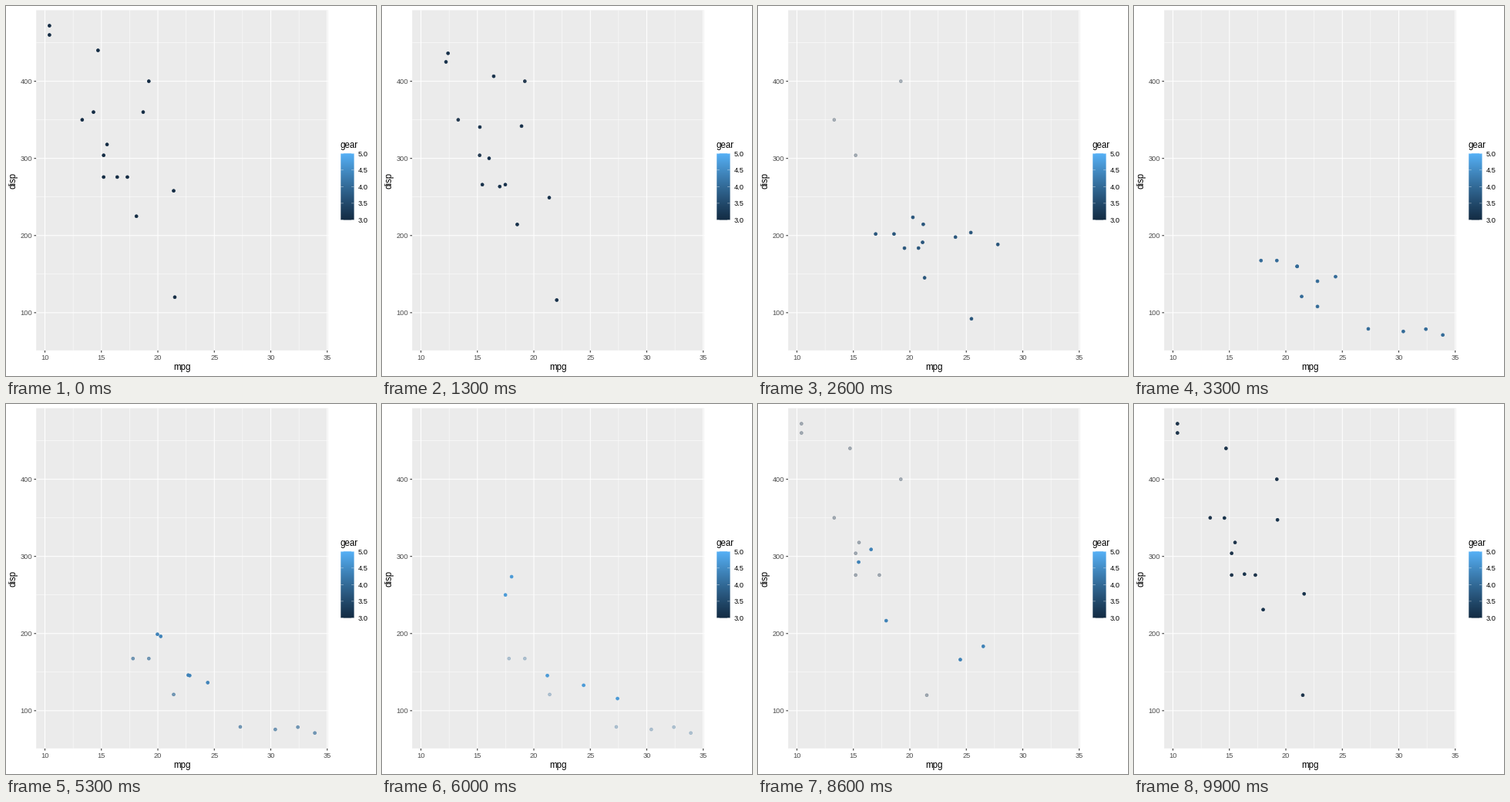
These frames come from a looping animation (480x480 px, 10 s). A matplotlib script:

```python
import math

import numpy as np
import matplotlib.pyplot as plt
from matplotlib.animation import FuncAnimation
from matplotlib.patches import Circle, Rectangle

SIZE = 480
DPI = 72  # one point is one pixel
FRAMES, INTERVAL = 100, 100
FIRST_MOVE, PERIOD, STEPS = 11, 34, 22

plt.rcParams["font.family"] = "Liberation Sans"
TITLE_SIZE, LABEL_SIZE = 11.5, 9.3
GREY_TEXT, GREY_TICK = "#4D4D4D", "#333333"
MAJOR, MINOR, BAR_TICK = 1.067, 0.533, 0.375
DOT_RADIUS, DOT_EDGE = 1.95, 0.709


def group(*runs):
    """Each run is one disp followed by the mpg of the cars sharing it."""
    return np.array([(mpg, disp) for disp, *mpgs in runs for mpg in mpgs])


CARS = {
    3: group((258, 21.4), (360, 18.7), (225, 18.1), (360, 14.3),
             (275.8, 16.4, 17.3, 15.2), (472, 10.4), (460, 10.4),
             (440, 14.7), (120.1, 21.5), (318, 15.5), (304, 15.2),
             (350, 13.3), (400, 19.2)),
    4: group((160, 21, 21), (108, 22.8), (146.7, 24.4), (140.8, 22.8),
             (167.6, 19.2, 17.8), (78.7, 32.4), (75.7, 30.4), (71.1, 33.9),
             (79, 27.3), (121, 21.4)),
    5: group((120.3, 26), (95.1, 30.4), (351, 15.8), (145, 19.7), (301, 15)),
}
GEARS = list(CARS)

# Layout: everything is spaced by half a text line
HALF = 5.5 * 72 / 72.27
TICK = HALF / 2
TITLE_H = 11
BAR_W = 1.2 * 14.4
BAR_H = 5 * BAR_W
AXIS = HALF + TITLE_H + HALF / 2 + 0.4 * HALF + TICK
LEFT, TOP = AXIS + 15, HALF
RIGHT, BOTTOM = SIZE - 6 * HALF - BAR_W - 12, SIZE - AXIS - 9
MID_X, MID_Y = (LEFT + RIGHT) / 2, (TOP + BOTTOM) / 2
BAR_LEFT = RIGHT + 3 * HALF
BAR_RIGHT = BAR_LEFT + BAR_W
BAR_TOP = MID_Y + (TITLE_H + HALF - BAR_H) / 2
BAR_BOTTOM = BAR_TOP + BAR_H

# Data limits, widened by a twentieth on each side
points = np.concatenate(list(CARS.values()))
low, high = points.min(axis=0), points.max(axis=0)
low, high = low - (high - low) / 20, high + (high - low) / 20


def px(mpg):
    return LEFT + (mpg - low[0]) / (high[0] - low[0]) * (RIGHT - LEFT)


def py(disp):
    return BOTTOM - (disp - low[1]) / (high[1] - low[1]) * (BOTTOM - TOP)


DARK = np.array([19, 43, 67])
LIGHT = np.array([86, 177, 247])
SAG = np.array([2.5, 4, 6])  # the ramp is a little darker in the middle


def gear_color(gear):
    t = (np.asarray(gear)[..., None] - 3) / 2
    return (DARK + (LIGHT - DARK) * t - SAG * 4 * t * (1 - t)) / 255


fig = plt.figure(figsize=(SIZE / DPI, SIZE / DPI), dpi=DPI, facecolor="white")
ax = fig.add_axes([0, 0, 1, 1])
ax.axis("off")


def line(x0, y0, x1, y1, width, color="white", z=2):
    ax.plot([x0, x1], [y0, y1], color=color, lw=width, zorder=z,
            solid_capstyle="butt", snap=False)


def label(x, y, text, size=LABEL_SIZE, color="black", ha="left", **kw):
    ax.text(x, y, text, fontsize=size, color=color, ha=ha, va="baseline", **kw)


def draw_panel():
    ax.add_patch(Rectangle((LEFT, TOP), RIGHT - LEFT, BOTTOM - TOP,
                           fc="#EBEBEB", lw=0, zorder=1, snap=False))
    for mpg in np.arange(12.5, 35, 5):
        line(px(mpg), TOP, px(mpg), BOTTOM, MINOR)
    for disp in range(150, 500, 100):
        line(LEFT, py(disp), RIGHT, py(disp), MINOR)
    for mpg in range(10, 40, 5):
        x = px(mpg)
        line(x, TOP, x, BOTTOM, MAJOR, z=3)
        line(x, BOTTOM, x, BOTTOM + TICK, MAJOR, GREY_TICK)
        label(x, 459, str(mpg), color=GREY_TEXT, ha="center")
    for disp in range(100, 500, 100):
        y = py(disp)
        line(LEFT, y, RIGHT, y, MAJOR, z=3)
        line(LEFT - TICK, y, LEFT, y, MAJOR, GREY_TICK)
        label(LEFT - 0.9 * HALF, round(y + 3.4), str(disp),
              color=GREY_TEXT, ha="right")
    label(MID_X, 472, "mpg", TITLE_SIZE, ha="center")
    label(13, MID_Y, "disp", TITLE_SIZE, ha="center",
          rotation=90, rotation_mode="anchor")


def coverage(lo, hi):
    """Pixels touched by lo..hi and the share of each that is covered."""
    cells = np.arange(math.floor(lo), math.ceil(hi))
    return cells, np.minimum(cells + 1, hi) - np.maximum(cells, lo)


def draw_legend():
    label(BAR_LEFT - 0.7, 184, "gear", TITLE_SIZE)
    xs, cover_x = coverage(BAR_LEFT, BAR_RIGHT)
    ys, cover_y = coverage(BAR_TOP, BAR_BOTTOM)
    gears = 5 - 2 * np.clip((ys + 0.5 - BAR_TOP) / BAR_H, 0, 1)
    ramp = np.empty((len(ys), len(xs), 4))
    ramp[..., :3] = gear_color(gears)[:, None]
    ramp[..., 3] = np.outer(cover_y, cover_x)
    ax.imshow(ramp, extent=(xs[0], xs[-1] + 1, ys[-1] + 1, ys[0]),
              aspect="auto", interpolation="nearest", zorder=1)
    for gear in np.arange(3, 5.1, 0.5):
        y = MID_Y + (TITLE_H + HALF) / 2 - (gear - 4) * (BAR_H / 2 - 0.14)
        line(BAR_LEFT, y, BAR_LEFT + BAR_W / 5, y, BAR_TICK)
        line(BAR_RIGHT - BAR_W / 5, y, BAR_RIGHT, y, BAR_TICK)
        label(BAR_RIGHT + HALF, round(y + 3.5), f"{gear:.1f}")


draw_panel()
draw_legend()
ax.set_xlim(0, SIZE)
ax.set_ylim(SIZE, 0)

dots = [ax.add_patch(Circle((0, 0), DOT_RADIUS, lw=DOT_EDGE, zorder=5))
        for _ in CARS[3]]


def pose(frame):
    """Gear before, gear after and the linear progress between them."""
    turn, step = divmod((frame - FIRST_MOVE) % FRAMES, PERIOD)
    steps = min(STEPS, FRAMES - FIRST_MOVE - turn * PERIOD)
    return GEARS[turn], GEARS[(turn + 1) % 3], min(step / steps, 1)


def update(frame):
    a, b, t = pose(frame)
    old, new = CARS[a], CARS[b]
    for i, dot in enumerate(dots):
        gear, alpha = a + (b - a) * t, 1
        if i < len(old) and i < len(new):
            spot = old[i] + (new[i] - old[i]) * t
        elif i < len(old):
            spot, gear, alpha = old[i], a, 1 - t
        elif i < len(new):
            spot, gear, alpha = new[i], b, t
        else:
            alpha = 0
        dot.set_visible(alpha > 0)
        if alpha > 0:
            dot.center = px(spot[0]), py(spot[1])
            dot.set_color((*gear_color(gear), alpha))
    return dots


anim = FuncAnimation(fig, update, frames=FRAMES, interval=INTERVAL,
                     init_func=lambda: update(0), repeat=True, repeat_delay=0)
plt.show()
```
